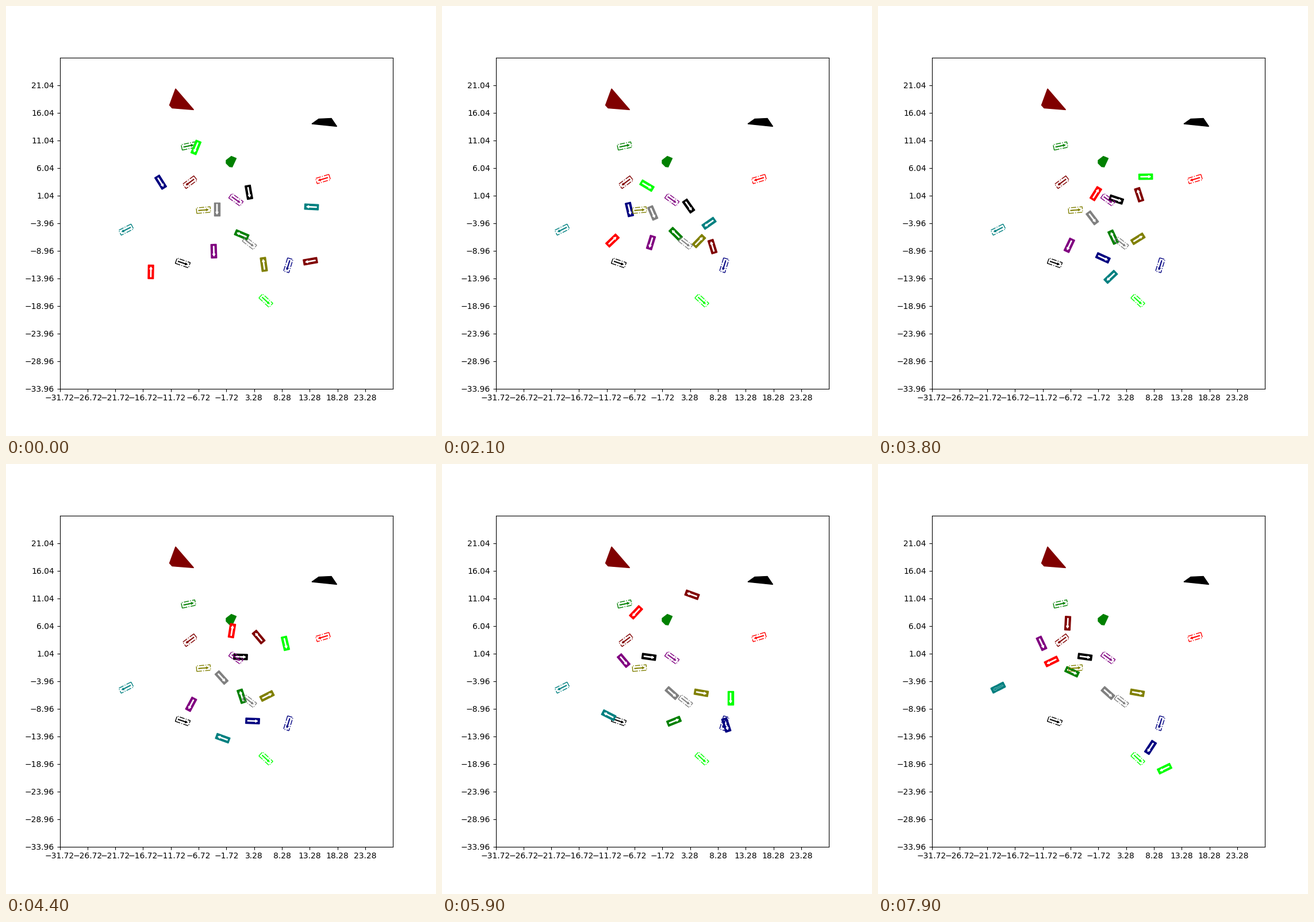
Animation of 748x748 px, one loop 8 s. Source, as a matplotlib script:

```python
import numpy as np
import matplotlib.pyplot as plt
from matplotlib.animation import FuncAnimation
from matplotlib.patches import Polygon

SIZE = 748
X0, Y0, SPAN = -31.72, -33.96, 60
TIMES = [0, 2.1, 4.4, 5.9, 7.9]

BOX = np.array([(-1.25, -0.5), (1.25, -0.5), (1.25, 0.5), (-1.25, 0.5)])
ARROW = np.array([(-0.9, -0.07), (0.5, -0.07), (0.5, -0.22), (0.9, 0),
                  (0.5, 0.22), (0.5, 0.07), (-0.9, 0.07)])

fig, ax = plt.subplots(figsize=(SIZE / 100, SIZE / 100), dpi=100)
ax.set_xlim(X0, X0 + SPAN)
ax.set_ylim(Y0, Y0 + SPAN)
ax.set_xticks(X0 + 5 * np.arange(12))
ax.set_yticks(Y0 + 5 * np.arange(12))


def to_data(pts):
    """Stage pixels (y down) to axis units."""
    x, y = np.asarray(pts, float).T
    return np.column_stack([X0 + (x / SIZE - 0.125) / 0.775 * SPAN,
                            Y0 + (1 - y / SIZE - 0.11) / 0.77 * SPAN])


def unit(angle):
    return np.array([np.cos(angle), np.sin(angle)])


def place(shape, pos, angle):
    c, s = unit(angle)
    return shape @ np.array([(c, s), (-s, c)]) + pos


def add(pts, **style):
    return ax.add_patch(Polygon(pts, closed=True, **style))


def obstacle(color, *pts):
    add(to_data(pts), color=color, lw=1)


class Leg:
    """Drive between two poses, forwards or in reverse.

    The curve leaves and arrives along the headings; in between, the car
    points along the curve. Short or sideways shifts slide and turn evenly.
    """

    def __init__(self, start, end):
        (self.p0, self.a0), (self.p1, a1) = start, end
        self.turn = (a1 - self.a0 + np.pi) % (2 * np.pi) - np.pi
        self.chord = self.p1 - self.p0
        dist = np.hypot(*self.chord)
        along = self.chord @ unit(self.a0 + self.turn / 2)
        self.sign = 1 if along >= 0 else -1
        self.steer = dist > 1.8 and abs(along) > 0.55 * dist
        reach = self.sign * dist / np.cos(self.turn / 4) ** 2
        self.m0, self.m1 = reach * unit(self.a0), reach * unit(a1)

    def pose(self, u):
        if not self.steer:
            return self.p0 + u * self.chord, self.a0 + u * self.turn
        b = 3 * self.chord - 2 * self.m0 - self.m1
        c = self.m0 + self.m1 - 2 * self.chord
        pos = self.p0 + u * (self.m0 + u * (b + u * c))
        dx, dy = self.sign * (self.m0 + u * (2 * b + 3 * u * c))
        return pos, np.arctan2(dy, dx)


class Car:
    """Speeds up from rest, cruises through its key poses, slows and parks."""

    def __init__(self, color, goal, *keys):
        poses = [(to_data([(x, y)])[0], np.radians(a))
                 for x, y, a in (goal, *keys)]
        self.legs = [Leg(*pair) for pair in zip(poses[1:], poses[2:])]
        self.body = add(place(BOX, *poses[1]), color=color, lw=1)
        self.mark = add(place(ARROW, *poses[1]), color="white", lw=1)
        add(place(BOX, *poses[0]), fill=False, ec=color, ls="-.", lw=1)
        add(place(ARROW, *poses[0]), color=color, lw=0.5)

    def move(self, t):
        last = len(self.legs) - 1
        i = min(np.searchsorted(TIMES, t, side="right") - 1, last)
        s = min((t - TIMES[i]) / (TIMES[i + 1] - TIMES[i]), 1)
        if i == 0:
            s = s * s
        elif i == last:
            s = s * (1.4 - 0.4 * s)
        pos, angle = self.legs[i].pose(s)
        self.body.set_xy(place(BOX, pos, angle))
        self.mark.set_xy(place(ARROW, pos, angle))


obstacle("maroon", (295, 144), (284.5, 172.5), (289, 177.5), (326.5, 180.5))
obstacle("black", (532, 205), (544, 196.5), (566, 195.5), (575.5, 209.5))
obstacle("green", (392, 261.5), (400.5, 265), (393.5, 280), (389, 279.5),
         (383, 273.5), (383, 268.5))

# goal first, then the key poses: x, y, heading in degrees
dock = (209, 389, 207)
cars = [
    Car("black", (307.5, 447, -19), (422.5, 324, -80), (429, 348, -55),
        (408, 335.5, -2), (360, 335.5, -8)),
    Car("navy", (491, 451, 253), (269, 306.5, -58), (326, 354, -77),
        (429, 447, -2), (494.5, 454, -72), (474, 493, 237)),
    Car("red", (551.5, 301, 197), (252, 462.5, 89), (296.5, 408, 44),
        (393, 290, 81), (337.5, 258, 227), (302, 343.5, 206)),
    Car("green", (317.5, 243.5, 12), (410, 398, 157), (406.5, 396.5, 135),
        (410, 404, 108), (403.5, 447.5, 22), (337.5, 361.5, -25)),
    Car("olive", (343.5, 355, 5), (448.5, 449.5, 98), (447, 409, 46),
        (454, 403.5, 27), (451, 398, -10)),
    Car("purple", (400, 337, -36), (361.5, 426.5, 272), (363.5, 411.5, 253),
        (322, 418, 242), (316, 342, 310), (284.5, 312, 295)),
    Car("maroon", (320, 306.5, 217), (529.5, 444, 190), (470.5, 418.5, 107),
        (439.5, 301, 130), (435, 227.5, 160), (330, 277, 267)),
    Car("gray", (423.5, 412.5, -38), (367, 353.5, 270), (366.5, 360, 293),
        (375, 371.5, 312), (400, 398.5, 318)),
    Car("teal", dock, (531.5, 349.5, 177), (464.5, 378, 215),
        (377, 477, 160), (290, 437, 153), dock),
    Car("lime", (452, 512.5, -43), (330.5, 246, 248), (356.5, 312.5, 329),
        (486, 312, 283), (502, 407, 270), (498.5, 530, 206)),
]


def update(i):
    t = 0 if i < 2 else i / 10
    for car in cars:
        car.move(t)
    return []


anim = FuncAnimation(fig, update, frames=80, interval=100, repeat=True,
                     repeat_delay=0, blit=False)
plt.show()
```
